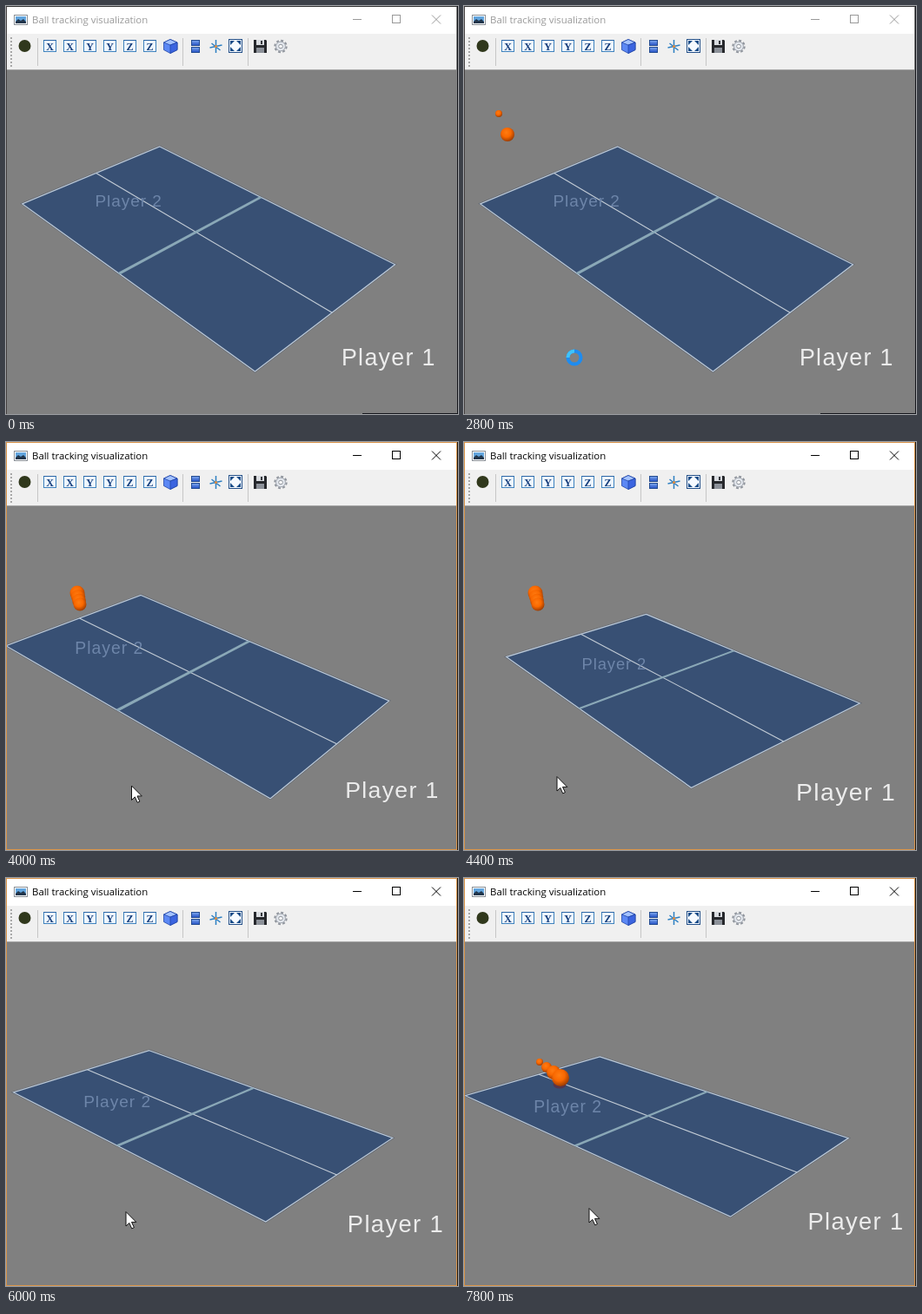
An HTML page for the animation above (8000 ms loop, 520 by 470 pixels).

```html
<!DOCTYPE html>
<html lang="en">
<head>
<meta charset="utf-8">
<title>Ball tracking visualization</title>
<style>
  html, body { margin: 0; width: 100%; height: 100%; overflow: hidden; background: #808080; }
  svg { display: block; width: 520px; height: 470px; }
  .crisp { shape-rendering: crispEdges; }
  .title { font: 11.4px "Open Sans", "Noto Sans", sans-serif; }
  .letter { font: bold 12px "Liberation Serif", serif; fill: #173f7c; text-anchor: middle; }
  .player { font-family: "Liberation Sans", Arial, sans-serif; letter-spacing: .05em; }
</style>
</head>
<body>
<svg viewBox="0 0 520 470" xmlns="http://www.w3.org/2000/svg">
  <defs>
    <radialGradient id="orange" cx=".42" cy=".36" r=".66">
      <stop offset="0" stop-color="#ff7c12"/>
      <stop offset=".5" stop-color="#f96800"/>
      <stop offset="1" stop-color="#983a00"/>
    </radialGradient>
    <linearGradient id="blue" x1="0" y1="0" x2="0" y2="1">
      <stop offset="0" stop-color="#7fa9ee"/>
      <stop offset="1" stop-color="#234fc4"/>
    </linearGradient>
    <clipPath id="view"><rect x="1" y="74" width="517" height="395"/></clipPath>
  </defs>

  <rect width="520" height="470" fill="#808080"/>
  <g clip-path="url(#view)">
    <polygon id="rim" fill="none" stroke="#2c3850" stroke-width="2.4" stroke-opacity=".4"/>
    <polygon id="table" fill="#385074" stroke="#bccad9" stroke-width="1.2"/>
    <polygon id="middle" stroke="#c3ccd6" stroke-width="1.1"/>
    <polygon id="net" fill="#8aa8b7"/>
    <text id="p2" class="player" fill="#6d85a9">Player 2</text>
    <text id="p1" class="player" fill="#ececec">Player 1</text>
    <ellipse id="shade" rx="7.5" ry="4.5" fill="#56364c"/>
    <g id="balls"></g>
  </g>

  <g class="crisp">
    <rect x="1" y="1" width="517" height="31" fill="#fff"/>
    <rect x="1" y="32" width="517" height="41" fill="#f0f0f0"/>
    <rect x="1" y="73" width="517" height="1" fill="#a5a5a5"/>
    <rect x="9" y="10" width="16" height="12" fill="#8a9097"/>
    <rect x="10" y="11" width="14" height="10" fill="#fff"/>
    <rect x="11" y="12" width="12" height="8" fill="#62a5de"/>
  </g>
  <path d="M11 20v-2l3-3 3 2 3-2 3 3v2z" fill="#22364c"/>
  <g id="caption">
    <text class="title" x="30" y="20">Ball tracking visualization</text>
    <g fill="none" stroke="currentColor">
      <path class="crisp" d="M399 15.5h10M444.5 10.5h9v9h-9z"/>
      <path d="M490 10.5l10 10M500 10.5l-10 10"/>
    </g>
  </g>

  <path class="crisp" d="M6 36v34" stroke="#a8a8a8" stroke-width="2" stroke-dasharray="2 2"/>
  <path class="crisp" d="M36.5 37v32M203.5 37v32M278.5 37v32" stroke="#c6c6c6"/>
  <circle cx="21.5" cy="46" r="7" fill="#30381c"/>
  <g id="axes"></g>
  <g stroke="#2347a8" stroke-width=".8" stroke-linejoin="round">
    <path d="M181.500 42l7.500-3.500 8 3.500v8.500l-8 4-7.500-4z" fill="#5c88f4"/>
    <path d="M181.500 42l7.500-3.500 8 3.500-8 3z" fill="#a3c2ff"/>
    <path d="M189 45v9.500l8-4V42z" fill="#3b64e0"/>
  </g>
  <g fill="url(#blue)" stroke="#244c91">
    <rect x="213.500" y="39.500" width="9" height="6"/>
    <rect x="213.500" y="47.500" width="9" height="6"/>
  </g>
  <path d="M241.500 39v15M234.500 48l14-3M236.500 43l10 8" fill="none" stroke="#2c7fc2" stroke-width="1.5"/>
  <circle cx="241.500" cy="46.500" r="1.6" fill="#e08a3c"/>
  <rect x="256.500" y="38.500" width="15" height="15" fill="#f6faff" stroke="#234f88"/>
  <path d="M258 40h5l-5 5zM270 40v5l-5-5zM258 52v-5l5 5zM270 52h-5l5-5z" fill="#174b88"/>
  <path d="M285 39h14l1 1v14h-15z" fill="#26282c"/>
  <path d="M288 39h9v6h-9z" fill="#d9dce0"/>
  <path d="M288 48h9v6h-9z" fill="#8d929a"/>
  <path d="M293 40h2v4h-2z" fill="#34373c"/>
  <circle cx="316" cy="46.5" r="6.7" fill="none" stroke="#8f949c" stroke-width="2" stroke-dasharray="2.9 2.36"/>
  <circle cx="316" cy="46.5" r="5.4" fill="#e4e8ee" stroke="#9aa0aa"/>
  <circle cx="316" cy="46.5" r="2.3" fill="#fff" stroke="#8f949c"/>

  <g id="inactive" class="crisp">
    <path d="M0 .5h520" stroke="#333"/>
    <path d="M.5 0v470" stroke="#464242"/>
    <path d="M519.5 0v470M410 469.5h110" stroke="#16181d"/>
  </g>
  <g id="active" class="crisp" fill="none">
    <path d="M519.5 0v470" stroke="#1b1a1a"/>
    <rect x=".5" y=".5" width="518" height="469" stroke="#d9944a"/>
  </g>

  <g id="spinner" fill="none" stroke-width="4">
    <circle r="7.5" stroke="#1e8cf0"/>
    <path d="M-7.5 0A7.5 7.5 0 0 1 0-7.5" stroke="#3fc4fb"/>
  </g>
  <path id="arrow" d="M0 0v16.500l3.800-3.600 2.900 6.400 2.700-1.200-2.900-6.200h5.300z" fill="#fff" stroke="#111"/>
</svg>

<script>
const LOOP = 8000, TICK = 200, WAKE = 3000;
const RAD = Math.PI / 180;
const $ = id => document.getElementById(id);
const set = (el, attrs) => { for (const k in attrs) el.setAttribute(k, attrs[k]); };
const mix = (a, b, f) => a.map((v, i) => v + (b[i] - v) * f);

// Scene in metres: along the table, across it, up; the origin is the table's centre
const HALF_LENGTH = 1.37, HALF_WIDTH = .7625, HALF_NET = .015;
const LABEL_SIZE = .1615;
const labels = { p1: [1.53, .035, -.367], p2: [-1.5, -.026, -.43] };

// Isometric camera with a 30 degree lens, turned by dragging the pointer
const VIEW = { x: 260, y: 272, width: 517, height: 395 };
const LENS = VIEW.height / 2 / Math.tan(15 * RAD);
const FOCUS = [.491, .082, .188], DISTANCE = 4.7;
const REST = [128.4, 405];

// Pointer stops: time, position
const stops = [
  [800, [127, 482]], [1800, [127, 405]], [2800, [127, 405]], [WAKE, REST],
  [3600, [182, 407]], [4400, [107, 386]], [5200, [138, 385]], [6200, [138, 385]],
  [7000, [124, 381]], [7800, [144, 381]]
];

// Ball trails: time, ball count, then x, y, radius of the oldest and newest ball
const trails = [
  [1200, 2, [40, 124, 4], [50, 148, 8]],
  [3200, 1, [-3, 141, 8], [-3, 141, 8]],
  [3800, 0],
  [4000, 4, [82, 174, 8.5], [85, 187, 7.5]],
  [4400, 4, [82, 174, 8.5], [85, 187, 7.5]],
  [5200, 4, [27, 156, 5], [69, 192, 10.5]],
  [5800, 0],
  [6400, 4, [62, 186, 4], [84, 199, 8.5]],
  [7000, 4, [98, 207, 4], [119, 217, 9.5]],
  [7800, 4, [87, 212, 4], [111, 230, 10]]
];

// The key in force at t, the one after it, and the share of the way between
function span(keys, t) {
  const i = Math.max(0, keys.findLastIndex(k => k[0] <= t));
  const a = keys[i], b = keys[i + 1] || a;
  return [a, b, a === b ? 0 : Math.max(0, (t - a[0]) / (b[0] - a[0]))];
}

function pointerAt(t) {
  const [a, b, f] = span(stops, t);
  return mix(a[1], b[1], f);
}

function camera([px, py]) {
  const yaw = (px - REST[0]) * 200 / VIEW.width * RAD;
  const pitch = Math.asin(1 / Math.sqrt(3)) + (py - REST[1]) * 200 / VIEW.height * RAD;
  const [cy, sy, cp, sp] = [Math.cos(yaw), Math.sin(yaw), Math.cos(pitch), Math.sin(pitch)];
  return point => {
    const [u, v, up] = point.map((p, i) => p - FOCUS[i]);
    const side = (u - v) * Math.SQRT1_2, away = -(u + v) * Math.SQRT1_2;
    const depth = away * cp - up * sp;
    const scale = LENS / (DISTANCE + depth * cy + side * sy);
    return [
      VIEW.x + scale * (side * cy - depth * sy),
      VIEW.y - scale * (up * cp + away * sp),
      scale
    ];
  };
}

function drawScene(project) {
  const flat = (u, v) => {
    const corners = [[-u, -v, 0], [u, -v, 0], [u, v, 0], [-u, v, 0]];
    return { points: corners.map(c => project(c).slice(0, 2)).join(" ") };
  };
  set($("rim"), flat(HALF_LENGTH, HALF_WIDTH));
  set($("table"), flat(HALF_LENGTH, HALF_WIDTH));
  set($("middle"), flat(HALF_LENGTH, 0));
  set($("net"), flat(HALF_NET, HALF_WIDTH));
  for (const id in labels) {
    const [x, y, scale] = project(labels[id]);
    const size = LABEL_SIZE * scale;
    set($(id), { x: x - size * .05, y, "font-size": size });
  }
}

function drawBalls(t) {
  const [a, b, f] = span(trails, t);
  const count = t < a[0] ? 0 : a[1];
  const moves = count === b[1];
  const [oldest, newest] = [2, 3].map(i => moves ? mix(a[i], b[i], f) : a[i]);
  balls.forEach((ball, i) => {
    if (i >= count) return set(ball, { r: 0 });
    const [cx, cy, r] = mix(oldest, newest, i / Math.max(1, count - 1));
    set(ball, { cx, cy, r });
  });
  const shaded = t >= 7400;
  set($("shade"), { opacity: +shaded });
  if (shaded) set($("shade"), { cx: newest[0] - 1, cy: newest[1] + 8 });
}

function drawWindow(t, [x, y]) {
  const awake = t >= WAKE, ink = awake ? "#000" : "#999";
  set($("caption"), { fill: ink, color: ink });
  set($("active"), { opacity: +awake });
  set($("inactive"), { opacity: +!awake });
  set($("spinner"), {
    opacity: +(!awake && t >= 800),
    transform: `translate(${x} ${y}) rotate(${(t - 2800) * .45})`
  });
  set($("arrow"), { opacity: +awake, transform: `translate(${x} ${y - .5})` });
}

const balls = Array.from({ length: 4 }, () => {
  const c = document.createElementNS("http://www.w3.org/2000/svg", "circle");
  set(c, { fill: "url(#orange)" });
  return $("balls").appendChild(c);
});

$("axes").innerHTML = [..."XXYYZZ"].map((c, i) => {
  const x = 43.5 + i * 23;
  return `<rect x="${x}" y="39.5" width="14" height="13" fill="#eef6ff" stroke="#3f82bd"/>
    <path d="M${x} 39.5h14" stroke="#2b65a5"/>
    <text class="letter" x="${x + 7}" y="51">${c}</text>`;
}).join("");

const start = performance.now();
function frame(now) {
  const t = Math.floor(Math.max(0, now - start) % LOOP / TICK) * TICK;
  const pointer = pointerAt(t);
  drawScene(camera(t < WAKE ? REST : pointer));
  drawBalls(t);
  drawWindow(t, pointer);
  requestAnimationFrame(frame);
}
frame(start);
</script>
</body>
</html>
```
